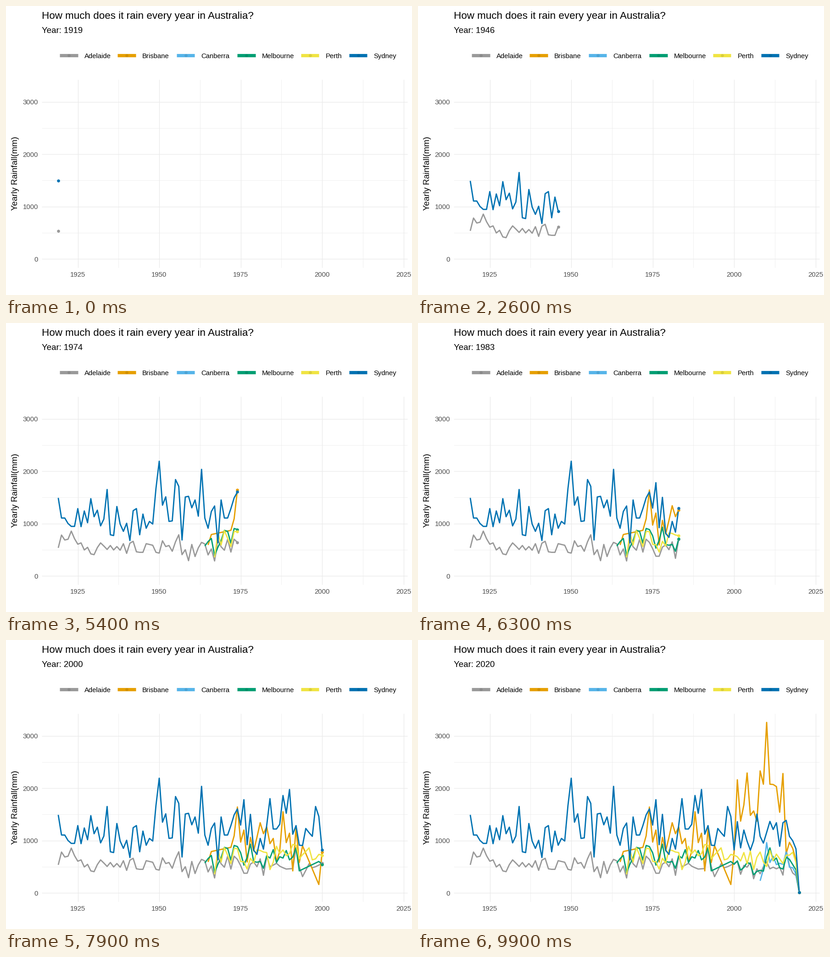
These frames come from a looping animation (885x632 px, 10000 ms). A matplotlib script:

```python
import numpy as np
import matplotlib.pyplot as plt
from matplotlib.animation import FuncAnimation
from matplotlib.colors import to_rgb

W, H = 885, 632
FRAMES, INTERVAL = 100, 100
FIRST, LAST = 1919, 2020
LEFT, RIGHT, TOP, BOTTOM = 77.5, 875, 161, 571.5
GAP = np.nan

plt.rcParams["font.family"] = "Liberation Sans"

# Yearly rainfall in mm; gaps are filled by straight lines
adelaide = [
    535, 780, 685, 700, 855, 710, 605, 630, 495, 545, 420, 405, 540, 630, 570,
    505, 580, 495, 560, 490, 615, 430, 625, 660, 460, 450, 450, 615, 600, 585,
    450, 435, 670, 560, 580, 470, 650, 785, 405, 500, 290, 600, 370, 535, 640,
    610, 400, 515, 285, 690, 555, 490, 700, 455, 700, 640, 520, 375, 375, 550,
    590, 500, 650, 335, 700, 500, 530, 565, 510, 480, 455, 460, 465, 860, 500,
    310, 430, 555, 480, 500, 530, 565, 600, 355, 525, 490, 580, 270, 460, 365,
    500, 590, 460, 490, 460, 490, 340, 820, 520, 380, 330, 8]
brisbane = [
    590, 790, GAP, GAP, GAP, GAP, GAP, 870, 1090, 1640, 970, 1200, 590, 1060,
    800, 1060, 1340, 1130, 1260, 940, 1040, 590, 800, 1550, 960, 1140, 420,
    1240, 580, 900, GAP, GAP, GAP, GAP, 160, 780, 2160, 1370, 1680, 2290, 1480,
    1565, 1370, 2330, 2075, 3256, 2075, 2070, 2030, 1540, 2280, 750, 965, 850,
    620, 8]
canberra = [230, 450, 960, 580, 700, 540, 565, 545, 780, 490, 480, 360, 8]
melbourne = [
    570, 655, 715, 385, 545, 670, 870, 850, 625, 905, 885, 765, 530, 680, 930,
    600, 585, 600, 470, 710, 665, 825, 580, 690, 665, 810, 630, 685, 865, 420,
    GAP, GAP, GAP, GAP, GAP, 600, 545, 610, 435, 485, 580, 555, 345, 410, 430,
    415, 690, 860, 615, 665, 480, 455, 680, 640, 540, 440, 8]
perth = [
    355, 820, 590, 865, 720, 560, 850, 845, 600, 595, 455, 660, 570, 820, 810,
    780, 770, 445, 585, 890, 750, 820, 710, 750, 925, 910, 650, 730, 790, 860,
    630, 650, 735, 720, 690, 610, 770, 555, 800, 445, 680, 780, 590, 505, 810,
    620, 740, 650, 560, 720, 720, 775, 580, 8]
sydney = [
    1490, 1105, 1105, 1000, 945, 945, 1285, 940, 1240, 1015, 1475, 1130, 1255,
    955, 1085, 1650, 785, 770, 1325, 990, 850, 1005, 675, 1245, 1285, 785,
    1180, 910, 1040, 990, 1670, 2190, 1350, 1510, 1040, 1050, 1840, 1710, 685,
    1507, 1520, 1300, 1450, 1140, 2035, 1105, 910, 1230, 1335, 630, 1450, 1105,
    1105, 1285, 1490, 1603, 1295, 1780, 920, 1500, 815, 735, 1040, 835, 1290,
    1800, 1220, 1220, 1310, 1860, 1520, 1975, 1120, 1285, 910, 905, 1230, 1150,
    1080, 1650, 1460, 820, 1360, 860, 1200, 985, 815, 995, 1505, 1080, 950,
    1155, 1365, 1210, 1340, 890, 1340, 1385, 1080, 995, 840, 8]

# name, colour, legend key x, data
CITIES = [
    ("Adelaide", "#999999", 117, adelaide),
    ("Brisbane", "#E69F00", 243, brisbane),
    ("Canberra", "#56B4E9", 371.5, canberra),
    ("Melbourne", "#009E73", 504, melbourne),
    ("Perth", "#F0E442", 642.5, perth),
    ("Sydney", "#0072B2", 747.5, sydney),
]


def px(year):
    return 156.5 + 7.1 * (year - 1925)


def py(mm):
    return 553 - 0.1145 * mm


def series(values):
    """Screen x, y and years of a record that runs up to LAST."""
    v = np.array(values, float)
    years = np.arange(LAST - len(v) + 1, LAST + 1)
    ok = ~np.isnan(v)
    return years, px(years), py(np.interp(years, years[ok], v[ok]))


# 72 dpi makes one point equal one pixel
fig = plt.figure(figsize=(W / 72, H / 72), dpi=72, facecolor="white")
ax = fig.add_axes([0, 0, 1, 1])
ax.set(xlim=(0, W), ylim=(H, 0))
ax.axis("off")


def label(x, y, s, size, color="black", **kw):
    return ax.text(x, y, s, size=size, color=color, va="baseline", **kw)


def grid(xs, ys, width):
    style = dict(color="#EBEBEB", lw=width, solid_capstyle="butt", zorder=1)
    for year in xs:
        ax.plot([px(year)] * 2, [TOP, BOTTOM], **style)
    for mm in ys:
        ax.plot([LEFT, RIGHT], [py(mm)] * 2, **style)


x_ticks = range(1925, 2026, 25)
y_ticks = range(0, 3001, 1000)
grid(np.arange(1937.5, 2025, 25), range(500, 3000, 1000), 0.8)
grid(x_ticks, y_ticks, 1.4)
for t in x_ticks:
    label(px(t), 592.5, str(t), 14.93, "#4D4D4D", ha="center")
for t in y_ticks:
    label(70, py(t) + 5.7, str(t), 14.93, "#4D4D4D", ha="right")

label(77.5, 28, "How much does it rain every year in Australia?", 22.4)
subtitle = label(77.5, 59, "", 18.67)
ax.text(25, (TOP + BOTTOM) / 2, "Yearly Rainfall(mm)", size=18.67, rotation=90,
        rotation_mode="anchor", ha="center", va="baseline")

tracks = []
for i, (name, color, x, values) in enumerate(CITIES):
    ax.plot([x, x + 39.7], [107.5] * 2, color=color, lw=7.2,
            solid_capstyle="butt")
    ax.plot(x + 20, 107.5, "o", ms=6.6, mew=0,
            color=[0.9 * c for c in to_rgb(color)])
    label(x + 53.8, 113.7, name, 14.93)
    line, = ax.plot([], [], color=color, lw=2.8, solid_capstyle="butt",
                    solid_joinstyle="round", zorder=3 + i)
    dot, = ax.plot([], [], "o", color=color, ms=6.6, mew=0, zorder=10 + i)
    tracks.append((line, dot, *series(values)))


def update(frame):
    year = FIRST + round(frame * (LAST - FIRST) / (FRAMES - 1))
    subtitle.set_text(f"Year: {year}")
    for line, dot, years, xs, ys in tracks:
        n = int(np.sum(years <= year))
        line.set_data(xs[:n], ys[:n])
        dot.set_data(xs[:n][-1:], ys[:n][-1:])
    return [subtitle]


anim = FuncAnimation(fig, update, frames=FRAMES, interval=INTERVAL,
                     init_func=lambda: update(0), repeat=True, repeat_delay=0)
plt.show()
```
